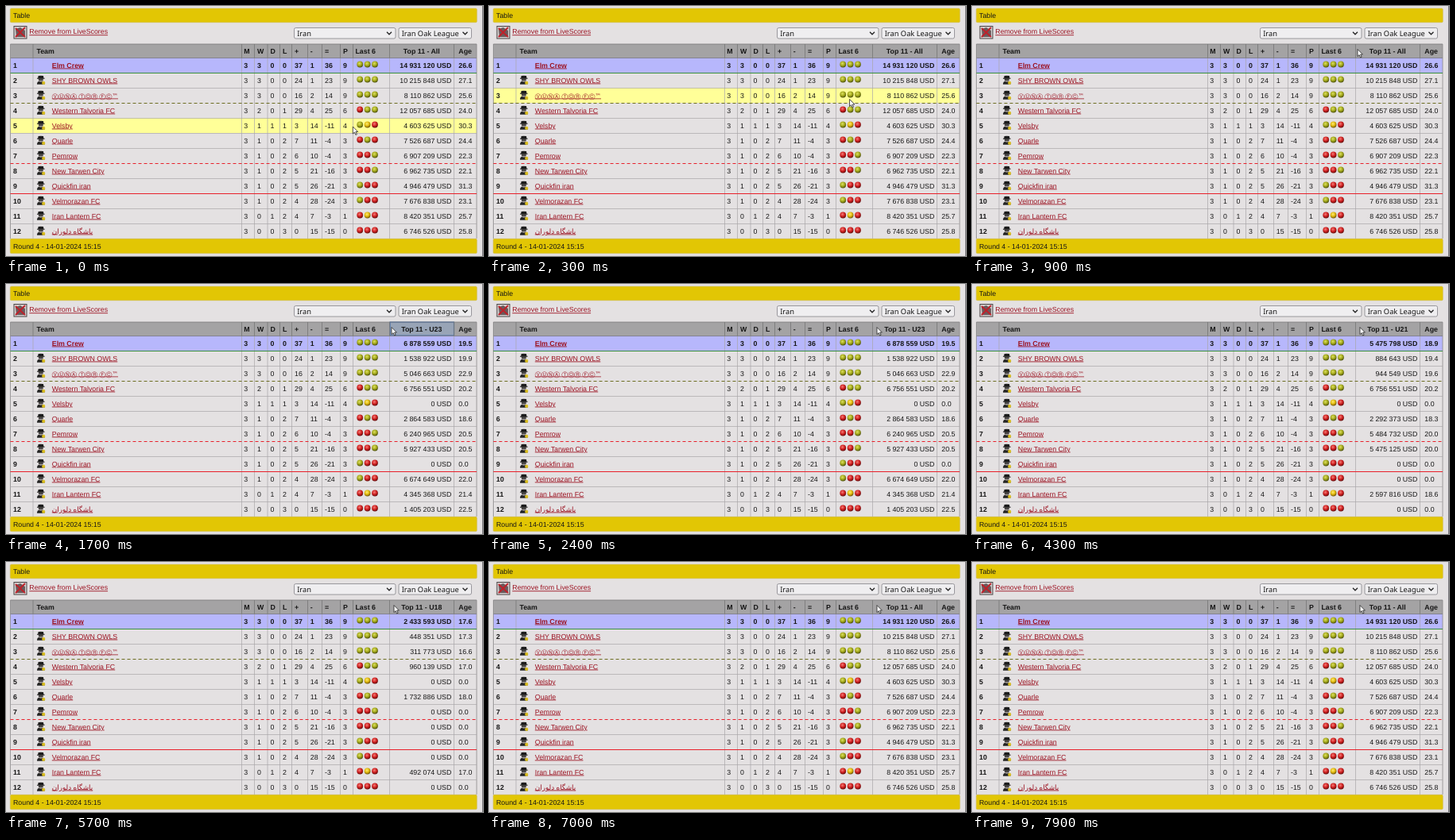
Write an HTML page that moves like this. It is 600x315 px and loops after 8000 ms.

```html
<!DOCTYPE html>
<html lang="en">
<head>
<meta charset="utf-8">
<title>League table</title>
<style>
html, body { margin: 0; width: 100%; height: 100%; overflow: hidden; background: #e4e1e2; }
svg { display: block; width: 600px; height: 315px; }
text { font: 8.8px "Liberation Sans", Arial, sans-serif; fill: #161616; text-rendering: geometricPrecision; white-space: pre; }
.b { font-weight: bold; }
.link { fill: #9c1322; text-decoration: underline; }
.circled { font: 7.7px "DejaVu Sans", sans-serif; }
.select { font: 9.3px "Noto Sans", sans-serif; }
.right { text-anchor: end; }
.mid { text-anchor: middle; }
</style>
</head>
<body>
<svg id="stage" viewBox="0 0 600 315">
<defs>
  <radialGradient id="g" cx=".42" cy=".36" r=".65"><stop stop-color="#dce060"/><stop offset=".55" stop-color="#a3a81a"/><stop offset="1" stop-color="#4c500c"/></radialGradient>
  <radialGradient id="y" cx=".42" cy=".36" r=".65"><stop stop-color="#ffec70"/><stop offset=".55" stop-color="#e0b80c"/><stop offset="1" stop-color="#6e5408"/></radialGradient>
  <radialGradient id="r" cx=".42" cy=".36" r=".65"><stop stop-color="#f47c76"/><stop offset=".55" stop-color="#d01f20"/><stop offset="1" stop-color="#640c0c"/></radialGradient>
  <g id="spy">
    <path d="M39 5.2Q39 1.6 41.6 1.2h4.4Q48.6 1.6 48.6 5.2z" fill="#242424"/>
    <path d="M40.8-2.4h6v2.6q-1 2-3 2t-3-2z" fill="#a09895"/>
    <path d="M40.6-5.4q3.2-.9 6.4 0l.4 2.6h1.2v1.1h-9.6v-1.1h1.2z" fill="#1b1b1b"/>
    <path d="M41-.5h5.6" stroke="#222" stroke-width="1.4"/>
    <circle cx="47.2" cy="3.4" r="2.1" fill="#d9bd22"/>
  </g>
</defs>
</svg>
<script>
const stage = document.getElementById('stage');
const TOP = 65, STEP = 19, LOOP = 8000;

// team name, results (g win, y draw, r loss), goals for, goals against
const teams = [
  ['Elm Crew', 'ggg', 37, 1],
  ['SHY BROWN OWLS', 'ggg', 24, 1],
  ['ⓋⓊⓃⒶ ⓉⓄⓇ ⒻⒸ™', 'ggg', 16, 2],
  ['Western Talvoria FC', 'rgg', 29, 4],
  ['Velsby', 'gyr', 3, 14],
  ['Quarle', 'rgr', 7, 11],
  ['Pemrow', 'rrg', 6, 10],
  ['New Tarwen City', 'rrg', 5, 21],
  ['Quickfin iran', 'grr', 5, 26],
  ['Velmorazan FC', 'grr', 4, 28],
  ['Iran Lantern FC', 'ryr', 4, 7],
  ['باشگاه دلوران', 'rrr', 0, 15]
];

// each entry: squad value / average age, one per team
const views = {
  All: '14 931 120/26.6,10 215 848/27.1,8 110 862/25.6,12 057 685/24.0,4 603 625/30.3,7 526 687/24.4,6 907 209/22.3,6 962 735/22.1,4 946 479/31.3,7 676 838/23.1,8 420 351/25.7,6 746 526/25.8',
  U23: '6 878 559/19.5,1 538 922/19.9,5 046 663/22.9,6 756 551/20.2,0/0.0,2 864 583/18.6,6 240 965/20.5,5 927 433/20.5,0/0.0,6 674 649/22.0,4 345 368/21.4,1 405 203/22.5',
  U21: '5 475 798/18.9,884 643/19.4,944 549/19.6,6 756 551/20.2,0/0.0,2 292 373/18.3,5 484 732/20.0,5 475 125/20.0,0/0.0,0/0.0,2 597 816/18.6,0/0.0',
  U18: '2 433 593/17.6,448 351/17.3,311 773/16.6,960 139/17.0,0/0.0,1 732 886/18.0,0/0.0,0/0.0,0/0.0,0/0.0,492 074/17.0,0/0.0'
};
const clicks = [[0, 'All'], [1500, 'U23'], [2900, 'U21'], [4600, 'U18'], [6400, 'All']];

const text = (x, y, s, cls = '', id = '') => `<text x="${x}" y="${y}" class="${cls}" id="${id}">${s}</text>`;
const rect = (x, y, w, h, fill, more = '') => `<rect x="${x}" y="${y}" width="${w}" height="${h}" fill="${fill}" ${more}/>`;
const line = (x1, y1, x2, y2, color, width = .8, dash = '') =>
  `<path d="M${x1} ${y1}L${x2} ${y2}" stroke="${color}" stroke-width="${width}" stroke-dasharray="${dash}"/>`;
const bar = (y, h, label, base) =>
  rect(5.3, y, 587, h, '#e2c604', 'rx="1.5" stroke="#cfbd5c" stroke-width=".6"') + text(9, base, label);

function select(x, w, label) {
  const cx = x + w - 8;
  return rect(x, 27.5, w, 13.5, '#efeef0', 'rx="2" stroke="#85838a" stroke-width=".8"') +
    text(x + 3.7, 37.6, label, 'select') +
    `<path d="M${cx - 3} 32.8l3 3 3-3" fill="none" stroke="#222" stroke-width="1.3"/>`;
}

const statX = [299.3, 316, 332.5, 348, 363, 382.8, 401, 424];
const columns = [34, 296.5, 312.5, 329, 344.5, 359.5, 379.5, 397.5, 420.5, 436.5, 482.5, 563.5];

function build() {
  let out = bar(3, 17.7, 'Table', 15) +
    rect(10, 25.5, 16, 15.5, '#d3cfcf', 'stroke="#4b4545" stroke-width="1"') +
    '<path d="M12 29l6-2 6 4v8H13z" fill="#6b5a5c"/><path d="M12 28l12 11M24 27L12 39" stroke="#c0202a" stroke-width="1.8"/>' +
    text(29.3, 35.3, 'Remove from LiveScores', 'link') +
    select(362.5, 127.5, 'Iran') + select(494, 91.5, 'Iran Oak League') +
    rect(5.5, 48, 586.5, 17, '#a4a3a4') +
    rect(483, 48, 80.5, 17, '#98a4b6', 'id="press" stroke="#4770a8" stroke-width="1.2"');

  teams.forEach((_, i) => out += rect(5.5, TOP + i * STEP, 586.5, STEP, 'none', `id="row${i}"`));
  columns.forEach(x => out += line(x, 48, x, 65, '#777') + line(x, 65, x, 293, '#aaa7aa', .7));
  out += line(5.5, 48, 592, 48, '#777') + line(5.5, 65.5, 592, 65.5, '#777') +
    line(5.5, 48, 5.5, 293, '#8b898b') + line(592, 48, 592, 293, '#8b898b');

  out += text(38.5, 60, 'Team', 'b') + text(439.5, 60, 'Last 6', 'b') +
    text(522.8, 60, '', 'b mid', 'head') + text(569.3, 60, 'Age', 'b');
  [...'MWDL+-=P'].forEach((s, i) => out += text(statX[i], 60, s, 'b'));

  teams.forEach(([name, form, plus, minus], i) => {
    const mid = TOP + i * STEP + 9.5, y = mid + 3;
    const count = c => form.split(c).length - 1;
    const won = count('g'), drawn = count('y');
    const bold = i ? '' : ' b';
    out += text(9, y, i + 1, 'b') + text(57.8, y, name, 'link' + bold + (i === 2 ? ' circled' : ''));
    if (i) out += `<use href="#spy" y="${mid}"/>`;
    [3, won, drawn, count('r'), plus, minus, plus - minus, 3 * won + drawn]
      .forEach((n, k) => out += text(statX[k], y, n, bold));
    [...form].forEach((c, k) => out += `<circle cx="${445.2 + k * 9.4}" cy="${mid - 1}" r="3.9" fill="url(#${c})"/>`);
    out += text(560.3, y, '', 'right' + bold, 'value' + i) + text(569.3, y, '', bold, 'age' + i);

    const edge = TOP + (i + 1) * STEP + .5;
    const [color, width, dash] = {
      0: ['#3a8f3c', 1.2, ''], 2: ['#6c6d21', 1.1, '4 3'], 6: ['#e8202a', 1.2, '4 3'], 8: ['#e8202a', 1.2, '']
    }[i] || ['#aaa7aa', .7, ''];
    out += line(5.5, edge, 592, edge, color, width, dash);
  });

  out += bar(293.3, 18.4, 'Round 4 - 14-01-2024 15:15', 305.8) +
    line(599.5, 0, 599.5, 315, '#77757a', 1) +
    '<path id="cursor" d="M0 0v9l2.1-1.9 1.5 3.3 1.5-.7-1.5-3.2h2.8z" fill="#fff" stroke="#222" stroke-width=".8"/>';
  stage.insertAdjacentHTML('beforeend', out);
}

const el = id => document.getElementById(id);
let shown;

function showView(name) {
  if (name === shown) return;
  shown = name;
  el('head').textContent = 'Top 11 - ' + name;
  views[name].split(',').forEach((entry, i) => {
    const [value, age] = entry.split('/');
    el('value' + i).textContent = value + ' USD';
    el('age' + i).textContent = age;
  });
}

const ease = (t, from, to) => {
  const p = Math.min(1, Math.max(0, (t - from) / (to - from)));
  return p * p * (3 - 2 * p);
};

function draw(now) {
  const t = now % LOOP;
  const [start, name] = clicks.findLast(c => c[0] <= t);
  showView(name);
  el('press').style.display = start && t - start < 300 ? '' : 'none';

  const go = ease(t, 0, 750);
  const x = 436.3 + 48.7 * go + 3 * ease(t, 1900, 2300);
  const y = 152 - 97.5 * go;
  el('cursor').setAttribute('transform', `translate(${x} ${y})`);
  const hover = Math.floor((y - TOP) / STEP);
  teams.forEach((_, i) => el('row' + i).setAttribute('fill', i === hover ? '#ffff98' : i ? 'none' : '#b7b7fc'));
  requestAnimationFrame(draw);
}

build();
requestAnimationFrame(draw);
</script>
</body>
</html>
```
